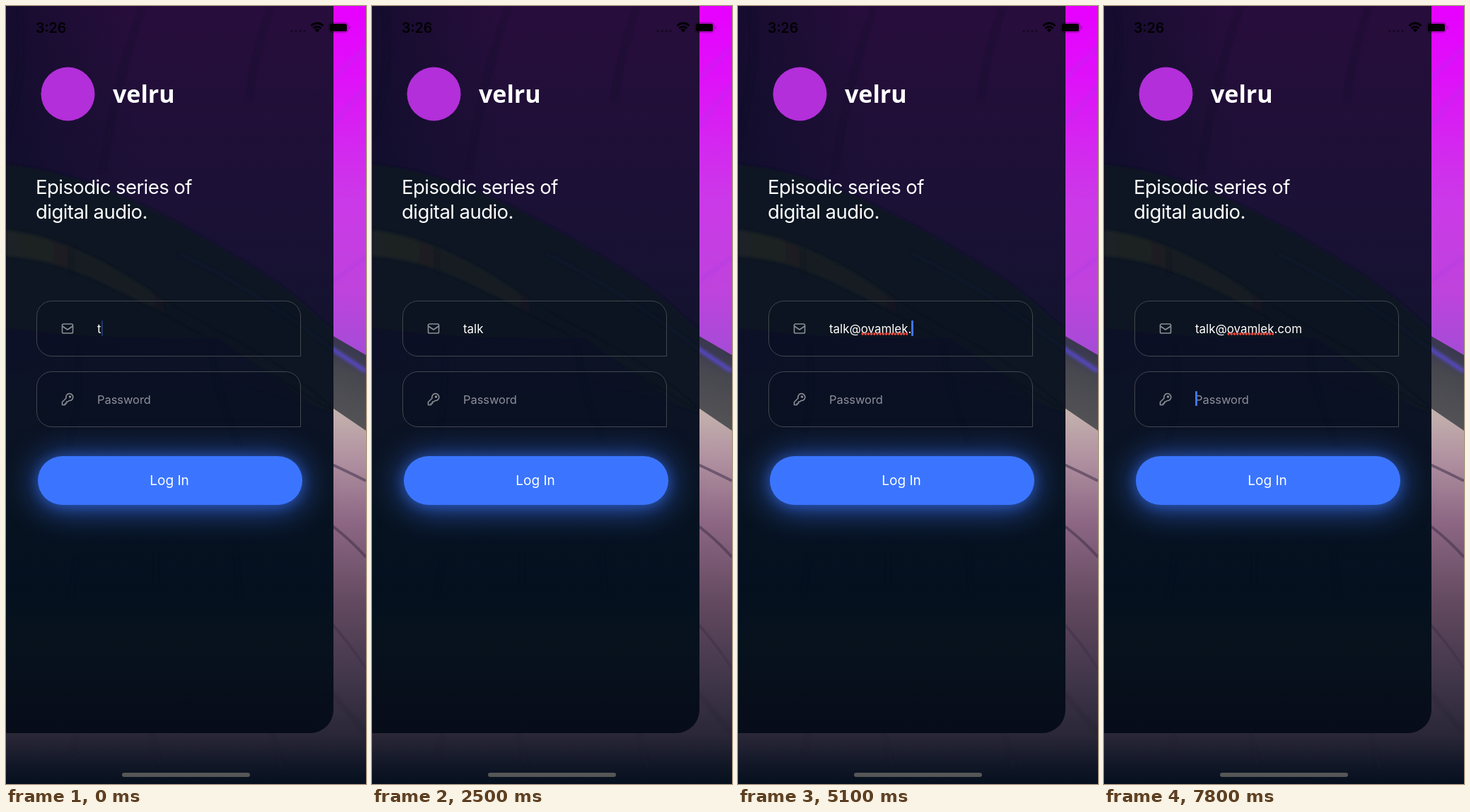
Write an HTML page that moves like this. It is 509 px wide and 1101 px high and loops after 8 s.

```html
<!DOCTYPE html>
<html lang="en">
<head>
<meta charset="utf-8">
<title>Log in</title>
<style>
  html, body { margin: 0; width: 100%; height: 100%; overflow: hidden; background: #07101d; }
  #stage { position: relative; width: 509px; height: 1101px; overflow: hidden; color: #fff; font-family: Inter, sans-serif; }
  #stage > * { position: absolute; }
  .art { left: 0; top: 0; }
  .clock { left: 42px; top: 19px; font-size: 19.5px; font-weight: 600; line-height: 24px; color: #000; }
  .brand { left: 151px; top: 100px; font: 700 34px/48px "Noto Sans", sans-serif; }
  .lead { left: 42px; top: 239px; font-size: 27.5px; line-height: 35px; letter-spacing: -.02em; white-space: pre; }
  .field {
    left: 43px; width: 372px; height: 77px;
    border: 1px solid #43464e; border-radius: 22px 22px 0 22px;
    background: rgba(4, 12, 24, .15);
  }
  .text { left: 129px; height: 22px; font-size: 16.9px; line-height: 22px; white-space: pre; }
  .text span { position: relative; display: inline-block; height: 22px; vertical-align: top; }
  .hint { color: #8d9098; font-size: 16.4px; }
  .caret { position: absolute; top: -1px; width: 2.5px; height: 22px; border-radius: 1px; background: #4174f4; }
  .button {
    left: 45px; top: 637px; width: 374px; height: 69px; border-radius: 35px;
    background: #3b75ff; font-size: 19px; line-height: 69px; text-align: center; text-indent: -2px;
    box-shadow: 0 2px 18px rgba(59, 117, 255, .45), 0 4px 46px 3px rgba(59, 117, 255, .65);
  }
  #domain::after {
    content: ""; position: absolute; left: 0; right: 0; top: 16px; height: 4px; opacity: var(--wrong, 0);
    background: radial-gradient(circle, #e8483c 1.5px, transparent 2px) 0 0 / 4.2px 4px repeat-x;
  }
  #tld.marked { background: #0c2941; box-shadow: 0 -1px #0c2941; }
  #tip {
    position: absolute; left: 0; top: 24px; width: 58px; height: 25px;
    border: 1px solid #3a3d42; border-radius: 0 13px 13px 2px; background: #000;
    color: #2e8df7; font-size: 17.3px; line-height: 25px; text-indent: 2px;
  }
  #tip svg { position: absolute; left: 40px; top: 7px; }
</style>
</head>
<body>
<div id="stage">
  <svg class="art" width="509" height="1101" fill="none">
    <defs>
      <linearGradient id="sky" gradientUnits="userSpaceOnUse" x1="0" y1="0" x2="0" y2="500">
        <stop stop-color="#e700ff"/><stop offset=".22" stop-color="#de13f8"/>
        <stop offset=".55" stop-color="#cb39e8"/><stop offset=".8" stop-color="#bf43dd"/>
        <stop offset="1" stop-color="#a34cd6"/>
      </linearGradient>
      <linearGradient id="ground" gradientUnits="userSpaceOnUse" x1="0" y1="570" x2="0" y2="1101">
        <stop stop-color="#c5b3ae"/><stop offset=".13" stop-color="#b192a1"/>
        <stop offset=".3" stop-color="#8d6784"/><stop offset=".52" stop-color="#62495f"/>
        <stop offset=".72" stop-color="#41364a"/><stop offset=".87" stop-color="#2a2737"/>
        <stop offset=".95" stop-color="#111727"/><stop offset="1" stop-color="#06101e"/>
      </linearGradient>
      <linearGradient id="rail" gradientUnits="userSpaceOnUse" x1="463" y1="480" x2="430" y2="570">
        <stop stop-color="#3a3950"/><stop offset=".3" stop-color="#47474f"/><stop offset="1" stop-color="#535356"/>
      </linearGradient>
      <linearGradient id="panel" x2="0" y2="1">
        <stop stop-color="#280d3c"/><stop offset=".14" stop-color="#210f38"/>
        <stop offset=".3" stop-color="#1a1135"/><stop offset=".42" stop-color="#151230"/>
        <stop offset=".53" stop-color="#0c1425"/><stop offset=".68" stop-color="#091421"/>
        <stop offset=".78" stop-color="#051020"/><stop offset=".88" stop-color="#07121d"/>
        <stop offset="1" stop-color="#070c19"/>
      </linearGradient>
      <linearGradient id="shade">
        <stop stop-color="#080c24" stop-opacity=".55"/><stop offset=".4" stop-color="#080c24" stop-opacity="0"/>
      </linearGradient>
      <linearGradient id="curve">
        <stop stop-color="#1e2225"/><stop offset=".3" stop-color="#171d23"/><stop offset=".7" stop-color="#0b1420"/>
      </linearGradient>
      <linearGradient id="low" x2="0" y2="1">
        <stop stop-color="#0d1128"/><stop offset="1" stop-color="#0b1322" stop-opacity="0"/>
      </linearGradient>
      <clipPath id="card"><path d="M0 0H463V996A33 33 0 0 1 430 1029H0Z"/></clipPath>
      <filter id="soft"><feGaussianBlur stdDeviation="2"/></filter>
    </defs>

    <rect width="509" height="560" fill="url(#sky)"/>
    <path d="M455 178L509 112M455 110L509 58M455 395L509 355" stroke="#a638e4" stroke-width="5" opacity=".3" filter="url(#soft)"/>
    <path d="M0 540H440L509 590V1101H0Z" fill="url(#ground)"/>
    <path d="M440 454L509 494V601L440 554Z" fill="url(#rail)"/>
    <path d="M440 471L509 517" stroke="#5848cf" stroke-width="6" opacity=".9" filter="url(#soft)"/>
    <path d="M455 646Q485 660 509 672M455 731Q485 753 509 780M455 868Q485 900 509 938" stroke="#40304a" stroke-width="4" opacity=".55"/>
    <path d="M375 1020L390 1080M205 1025L218 1075M100 1025L94 1060M455 965L509 1030" stroke="#1c1b2c" stroke-width="4" opacity=".3" filter="url(#soft)"/>

    <g clip-path="url(#card)">
      <rect width="463" height="1029" fill="url(#panel)"/>
      <rect width="463" height="520" fill="url(#shade)"/>
      <path d="M18 0Q30 90 0 185M193 0Q155 110 136 235M375 0Q350 70 343 135" stroke="#0c0c28" stroke-width="6" opacity=".35" filter="url(#soft)"/>
      <path d="M0 224C110 235 210 285 320 352S420 425 463 458V575C330 535 150 466 0 457Z" fill="#0b1420" filter="url(#soft)"/>
      <path d="M0 317C70 325 140 358 220 414S360 480 463 572C370 515 280 462 200 423S80 360 0 354Z" fill="url(#curve)" filter="url(#soft)"/>
      <path d="M245 350Q350 400 463 487" stroke="#151a43" stroke-width="3" opacity=".4" filter="url(#soft)"/>
      <path d="M0 457Q130 472 300 470L463 585V690H0Z" fill="url(#low)"/>
      <path d="M92 345V380M100 475Q110 550 90 620M290 480Q300 560 330 620M100 780L92 835M212 775V820M325 770L330 835" stroke="#071020" stroke-width="4" opacity=".3" filter="url(#soft)"/>
    </g>

    <circle cx="87.5" cy="124.5" r="38" fill="#b32fd9"/>

    <g fill="#000">
      <g opacity=".35"><circle cx="404" cy="35.5" r="1.8"/><circle cx="410" cy="35.5" r="1.8"/><circle cx="416" cy="35.5" r="1.8"/><circle cx="422" cy="35.5" r="1.8"/></g>
      <path d="M440 37.5L436.5 33.5Q440 30.5 443.5 33.5Z"/>
      <path d="M431.5 28Q440 20.5 448.5 28M434.5 31.5Q440 27 445.5 31.5" fill="none" stroke="#000" stroke-width="2.7"/>
      <rect x="456.5" y="23.5" width="27" height="14" rx="4" fill="none" stroke="#000" stroke-opacity=".35"/>
      <rect x="458" y="25" width="24" height="11" rx="2.5"/>
      <path d="M485.5 28Q488 30.5 485.5 33Z" opacity=".4"/>
    </g>
  </svg>

  <div class="clock">3:26</div>
  <div class="brand">velru</div>
  <div class="lead">Episodic series of
digital audio.</div>

  <div class="button">Log In</div>
  <div class="field" style="top:417px"></div>
  <div class="field" style="top:517px"></div>

  <svg class="art" width="509" height="1101" fill="none" stroke="#8b8f96" stroke-width="1.6" stroke-linejoin="round" stroke-linecap="round">
    <rect x="79.5" y="450" width="15" height="13" rx="1.8"/>
    <path d="M79.5 453L87 458L94.5 453"/>
    <path d="M85 555A5 5 0 1 1 89 558.5L87.5 560H85.5V562.5H83.5V564.5H79.5V560.5Z"/>
    <circle cx="90.5" cy="553" r="1" fill="#8b8f96"/>
    <rect x="164" y="1085" width="181" height="6" rx="3" fill="#565656" stroke="none"/>
  </svg>

  <div class="text" style="top:446px"><span id="user"></span><span id="domain"></span><span id="tld"></span><i class="caret" id="mailCaret"></i></div>
  <div class="text hint" style="top:546px">Password<i class="caret" id="passCaret" style="left:0;height:21px"></i></div>
</div>

<script>
const LOOP = 8000;
const parts = { user: "talk@", domain: "ovamlek", tld: ".com" };
const $ = id => document.getElementById(id);

// [time, value] steps, each held until the next one
const typed = [[0, 1], [1400, 2], [1500, 3], [1800, 4], [3000, 5], [3600, 6], [3800, 7], [3900, 8],
  [4500, 9], [4700, 10], [4900, 11], [5000, 12], [5100, 13], [5300, 14], [5500, 15], [5600, 16]];

const fadeOut = t => [[t, .7], [t + 100, .3], [t + 200, 0]];
const fadeIn = t => [[t, .5], [t + 100, 1]];
const blink = [[0, .35], [100, 0], ...fadeIn(300), [900, .6], [1000, 0], [1200, 1],
  ...fadeOut(2300), ...fadeIn(2700), [3500, .6], [3600, 1], [4400, .6], [4500, 1],
  ...fadeOut(6100), ...fadeIn(6500), ...fadeOut(7100), ...fadeIn(7500), [7800, 0]];

const at = (steps, t) => steps.findLast(s => s[0] <= t)[1];

const tip = document.createElement("div");
tip.id = "tip";
tip.innerHTML = 'çöm<svg width="11" height="11" stroke="#85888d" stroke-width="1.2"><path d="M.5 .5L10.5 10.5M10.5 .5L.5 10.5"/></svg>';

function draw(now) {
  const t = now % LOOP;
  let left = at(typed, t);
  for (const id in parts) {
    $(id).textContent = parts[id].slice(0, Math.max(0, left));
    left -= parts[id].length;
  }
  const suggest = t >= 5800 && t < 7200;
  $("domain").style.setProperty("--wrong", t >= 5100 ? 1 : 0);
  $("tld").classList.toggle("marked", suggest);
  if (suggest) $("tld").append(tip);
  $("mailCaret").style.opacity = at(blink, t);
  $("passCaret").style.opacity = t >= 7800 ? 1 : 0;
}

const start = performance.now();
function tick(now) {
  draw(Math.max(0, now - start));
  requestAnimationFrame(tick);
}
tick(start);
</script>
</body>
</html>
```
